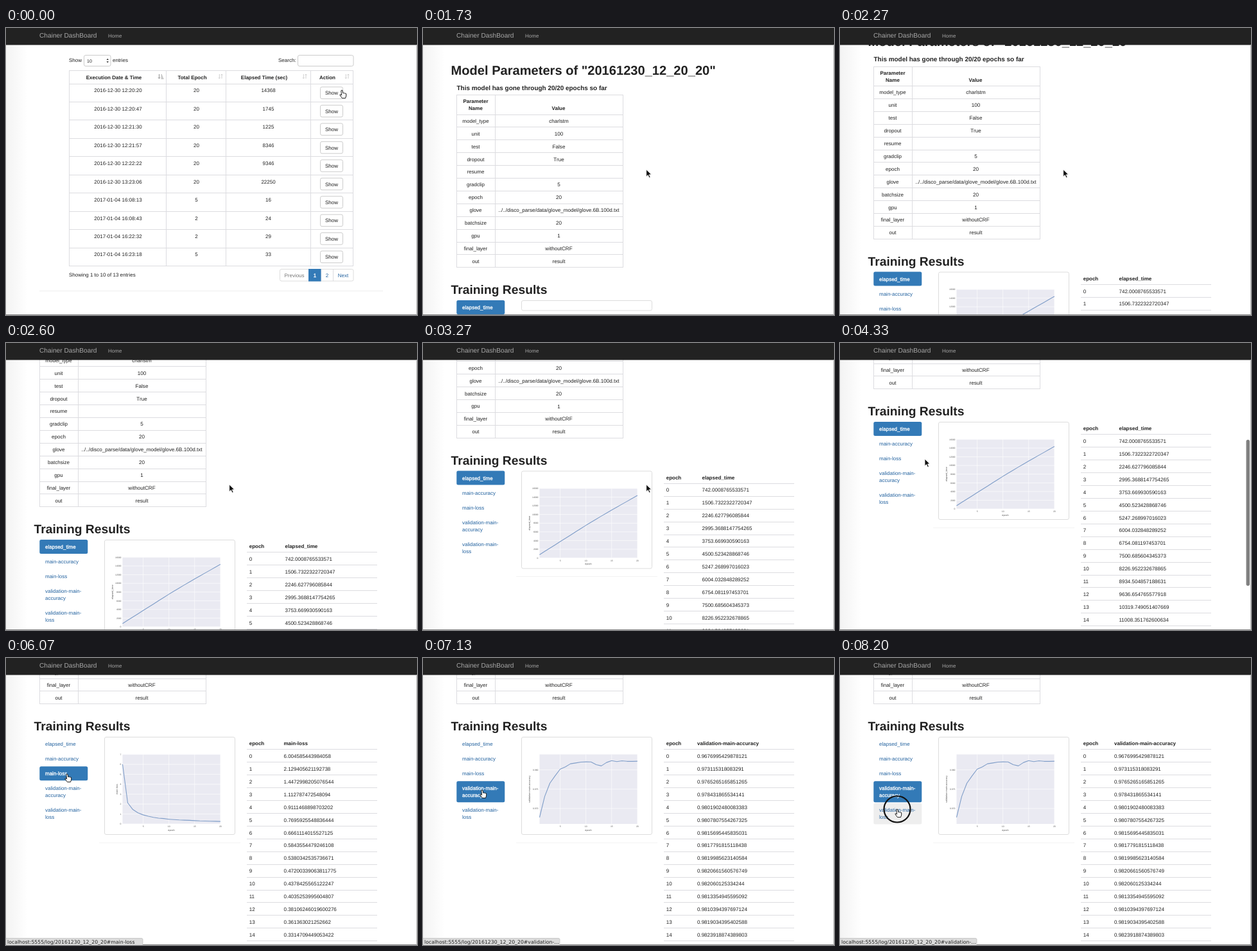
These frames come from a looping animation (640x448 px, 8.27 s). An HTML page:

```html
<!DOCTYPE html>
<html>
<head>
<meta charset="utf-8">
<title>Chainer DashBoard</title>
<style>
html, body { margin: 0; width: 100%; height: 100%; overflow: hidden; background: #fff; }
svg { display: block; }
text { font: 8px "Liberation Sans", Arial, sans-serif; fill: #222; text-rendering: geometricPrecision; white-space: pre; }
.b { font-weight: bold; }
.m { text-anchor: middle; }
.e { text-anchor: end; }
.link { fill: #23629f; }
.on { fill: #fff; stroke: #fff; stroke-width: .3; }
.nav { fill: #a6a6a6; }
.muted { fill: #777; }
.tick { fill: #555; }
.box { fill: #fff; stroke: #ccc; }
.card { fill: #fff; stroke: #ddd; }
.line { fill: none; stroke: #dcdce0; shape-rendering: crispEdges; }
.faint { stroke: #eee; shape-rendering: crispEdges; }
.grid { stroke: #fff; stroke-width: .6; }
#url { font: 7.75px "DejaVu Sans", sans-serif; }
</style>
</head>
<body>
<svg id="stage" width="640" height="448" viewBox="0 0 640 448"></svg>
<script>
const LOOP = 8270, PAGE_AT = 700, LOADED_AT = 1850, PRESS = 200;
const $ = id => document.getElementById(id);

// Markup helpers; text is placed by its vertical centre.
const text = (x, y, s, cls = '', size = 8) =>
  `<text x="${x}" y="${y + size * .36}" class="${cls}" style="font-size:${size}px">${s}</text>`;
const rect = (x, y, w, h, attrs, r = 0) =>
  `<rect x="${x}" y="${y}" width="${w}" height="${h}" rx="${r}" ${attrs}/>`;
const path = (d, attrs = 'class="line"') => `<path d="${d}" ${attrs}/>`;
const each = (n, fn) => Array.from({length: n}, (_, i) => fn(i)).join('');

let seed = 7;
const noise = size => {
  seed = seed * 16807 % 2147483647;
  return (seed / 2147483647 * 2 - 1) * size;
};

// Each metric is a smooth curve over epochs 1 to 20 plus a little noise.
const tabs = [
  {name: 'elapsed_time', col: 434.5, axis: [0, 16000, 2000, 0],
   curve: n => 750 * n - 26 * Math.max(0, n - 10) ** 1.38 + noise(8)},
  {name: 'main-accuracy', col: 430.5, axis: [.9, 1, .02, 2],
   curve: n => 1 - .0823 * n ** -.74 + noise(.0003)},
  {name: 'main-loss', col: 432.5, axis: [0, 7, 1, 0],
   curve: n => 4 * n ** -.92 + 2 * n ** -8 + noise(.01)},
  {name: 'validation-main-accuracy', col: 427, axis: [.966, .984, .005, 3],
   curve: n => .9823 - .0145 * Math.exp((1 - n) / 2.2) - .0016 * Math.exp(-((n - 12.7) ** 2)) + noise(.0003)},
  {name: 'validation-main-loss'}
];
tabs.reduce((y, tab) => {
  tab.lines = tab.name.split(/(?<=^validation-main-)/);
  tab.h = 11 + 11 * tab.lines.length;
  tab.y = y;
  return y + tab.h + 1.1;
}, 425);

function listPage() {
  const heads = [['Execution Date &amp; Time', 168, 241], ['Total Epoch', 290, 334],
    ['Elapsed Time (sec)', 402, 465], ['Action', 500.5, 531]];
  const rows = `2016-12-30 12:20:20|20|14368
2016-12-30 12:20:47|20|1745
2016-12-30 12:21:30|20|1225
2016-12-30 12:21:57|20|8346
2016-12-30 12:22:22|20|9346
2016-12-30 13:23:06|20|22250
2017-01-04 16:08:13|5|16
2017-01-04 16:08:43|2|24
2017-01-04 16:22:32|2|29
2017-01-04 16:23:18|5|33`.split('\n').map(row => row.split('|'));
  const centers = [174.5, 296.5, 408.5];
  const sortIcon = (x, active) => path(active
    ? `M${x - 2.5} 72v7l-1.5-1.7m1.5 1.7l1.5-1.7M${x + .5} 73h1.5m-1.5 2h2.3m-2.3 2h3.1m-3.1 2h4`
    : `M${x - 1.7} 72v7l-1.3-1.5m1.3 1.5l1.3-1.5M${x + 2} 79v-7l-1.3 1.5m1.3-1.5l1.3 1.5`,
    `fill="none" stroke="${active ? '#888' : '#ccc'}" stroke-width=".9"`);
  return text(98, 50.5, 'Show') + rect(121.5, 42.5, 41.5, 17, 'class="box"', 2.5) +
    text(126, 51, '10', '', 7) +
    path('M156.5 50l1.7-2.5 1.7 2.5zM156.5 52l1.7 2.5 1.7-2.5z', 'fill="#444"') +
    text(166, 50.5, 'entries') + text(424, 50.5, 'Search:') +
    rect(454.5, 42.5, 86.5, 17, 'class="box"', 2.5) +
    rect(98.5, 66.5, 442, 305, 'class="line"') +
    path('M249.5 66.5v305M342.5 66.5v305M474.5 66.5v305') +
    heads.map(([s, x, icon], i) => text(x, 76.7, s, 'b m') + sortIcon(icon, !i)).join('') +
    rows.map((row, i) => {
      const y = 87 + 28.45 * i;
      return path(`M98.5 ${y}h442`) + row.map((s, k) => text(centers[k], y + 10.5, s, 'm')).join('') +
        rect(489.5, y + 5, 35, 18.5, 'class="box"', 2.5) + text(507, y + 14.4, 'Show', 'm');
    }).join('') +
    text(98, 385.5, 'Showing 1 to 10 of 13 entries') +
    rect(426.5, 376.5, 114.5, 18.5, 'class="card"', 2.5) + path('M490.5 376.5v18.5M509.5 376.5v18.5') +
    rect(471, 376, 19.5, 19.5, 'fill="#337ab7"') +
    text(449, 386, 'Previous', 'm muted') + text(481, 386, '1', 'm on') +
    text(500, 386, '2', 'm link') + text(525, 386, 'Next', 'm link') +
    path('M52 410.5h535', 'class="faint"');
}

function modelPage() {
  const params = Object.entries({
    model_type: 'charlstm', unit: 100, test: 'False', dropout: 'True', resume: '', gradclip: 5, epoch: 20,
    glove: '../../disco_parse/data/glove_model/glove.6B.100d.txt',
    batchsize: 20, gpu: 1, final_layer: 'withoutCRF', out: 'result'
  });
  return text(43.5, 65.5, 'Model Parameters of "20161230_12_20_20"', 'b', 20.1) +
    text(52.5, 93, 'This model has gone through 20/20 epochs so far', 'b', 9.95) +
    rect(52.5, 104.5, 259, 269.3, 'class="line"') + path('M112 104.5v269.3') +
    text(82, 114.5, 'Parameter', 'b m') + text(82, 125.3, 'Name', 'b m') + text(211, 125.3, 'Value', 'b m') +
    params.map(([k, v], i) => {
      const y = 135 + 19.9 * i;
      return path(`M52.5 ${y}h259`) + text(82, y + 10, k, 'm') + text(211.5, y + 10, v, 'm', 8.1);
    }).join('') +
    text(43.5, 408.2, 'Training Results', 'b', 19.3);
}

function chart(name, [lo, hi, step, digits], data) {
  const X = epoch => 181.5 + 8.02 * (epoch - 1), Y = v => 561 - 108.5 * (v - lo) / (hi - lo);
  const first = Math.ceil(lo / step - 1e-6);
  const ticks = Math.floor(hi / step + 1e-6) - first + 1;
  return rect(153.5, 425.5, 203, 152, 'class="card"', 2.5) +
    rect(181.5, 452.5, 152.5, 108.5, 'fill="#eaeaf2"') +
    each(4, i => {
      const x = X(5 * i + 5);
      return path(`M${x} 452.5v108.5`, 'class="grid"') + text(x, 565.2, 5 * i + 5, 'tick m', 3.4);
    }) +
    each(ticks, i => {
      const v = (first + i) * step;
      return path(`M181.5 ${Y(v)}h152.5`, 'class="grid"') + text(179.5, Y(v), v.toFixed(digits), 'tick e', 3.4);
    }) +
    text(257.5, 570.2, 'epoch', 'tick m', 3.8) +
    `<g transform="translate(${hi === 7 ? 173 : 166} 506.7) rotate(-90)">${text(0, 0, name, 'tick m', 3.8)}</g>` +
    path('M' + data.map((v, i) => `${X(i + 1)} ${Y(v)}`).join('L'),
      'fill="none" stroke="#7f9dc8" stroke-width="1.1" stroke-linejoin="round"');
}

function panel({name, col, axis, curve}) {
  const data = Array.from({length: 20}, (_, i) => curve(i + 1));
  return chart(name, axis, data) + path('M145 590h220', 'class="faint" opacity=".7"') +
    text(378.7, 435.2, 'epoch', 'b') + text(col, 435.2, name, 'b') +
    data.map((v, i) => {
      const y = 444.8 + 19.93 * i;
      return path(`M374.5 ${y}h203.5`) + text(378.7, y + 10.3, i) + text(col, y + 10.3, v);
    }).join('');
}

const tabList = (active, hover) => tabs.map((tab, i) => {
  const fill = i === active ? '#337ab7' : i === hover ? '#eee' : 'none';
  return rect(52.3, tab.y, 75, tab.h, `fill="${fill}"`, 2.5) +
    tab.lines.map((s, k) => text(61, tab.y + 11.2 + 11 * k, s, i === active ? 'on' : 'link')).join('');
}).join('');

$('stage').innerHTML = `
  <defs><linearGradient id="shade"><stop stop-color="#f3f3f3"/><stop offset="1" stop-color="#fff"/></linearGradient></defs>
  ${rect(0, 26, 34, 422, 'fill="url(#shade)"')}
  <g id="list">${listPage()}</g>
  <g id="model">${modelPage()}<g id="tabs"></g>
    <g id="pending">${rect(153.5, 425.5, 203, 15.5, 'class="card"', 2.5)}</g>
    ${each(4, i => `<g id="panel${i}">${panel(tabs[i])}</g>`)}
  </g>
  ${rect(0, 0, 640, 26.5, 'fill="#222"')}
  ${text(52, 11.7, 'Chainer DashBoard', 'nav', 10.2)}
  ${text(159, 11.7, 'Home', 'nav')}
  ${path('M0 447.5h640', 'stroke="#888"')}
  ${path('M639.5 26v422', 'stroke="#bbb"')}
  ${rect(632.5, 0, 5.5, 228, 'id="thumb" fill="#808080"', 2.7)}
  <g id="status">${rect(-2, 437.5, 215, 14, 'fill="#dcdcdc" stroke="#bbb" stroke-width=".7"', 2)}
    <text id="url" x="2" y="446"></text></g>
  <g id="cursor">
    <circle id="ring" r="20.5" fill="none" stroke="#111" stroke-width="2.2"/>
    ${path('M0 0v11l2.6-2.4 1.9 4.2 1.9-.9-1.9-4 3.4-.2z', 'id="arrow" fill="#111" stroke="#fff" stroke-width=".8"')}
    ${path('M-1.2 .8q1.2-1.6 2.3 0l.7 4q1-.9 1.7.1q1-.7 1.7.3q1.3-.5 1.5.8v3l-1.2 3.6h-5l-3.4-4.6q-.5-1.5 1.2-1.2l1.3 1.3z',
      'id="hand" fill="#fff" stroke="#111" stroke-width=".95" stroke-linejoin="round"')}
  </g>`;

// Eases through moves {from, to, v}, resting between them.
const along = (start, moves, t) => moves.reduce((value, {from, to, v}) => {
  const p = Math.min(1, Math.max(0, (t - from) / (to - from)));
  return value + (v - value) * p * p * (3 - 2 * p);
}, start);

const moves = [
  {from: 900, to: 1450, x: 347.7, y: 221},
  {from: 3900, to: 4310, x: 132, y: 181},
  {from: 4400, to: 4650, x: 93, y: 158},
  {from: 5200, to: 5500, x: 95, y: 181},
  {from: 6250, to: 6600, x: 92, y: 206},
  {from: 7650, to: 8000, x: 89, y: 236}
];
const movesX = moves.map(m => ({...m, v: m.x})), movesY = moves.map(m => ({...m, v: m.y}));
const scrolls = [{from: 2050, to: 2580, v: 118}, {from: 2800, to: 3250, v: 225.5}, {from: 3500, to: 3950, v: 302}];
const presses = [150, 4750, 5650, 6850, 8100];
const show = (id, on) => $(id).style.display = on ? '' : 'none';

function draw() {
  const t = performance.now() % LOOP;
  const x = along(523, movesX, t), y = along(97, movesY, t), scroll = along(0, scrolls, t);
  const onModel = t >= PAGE_AT, loaded = t >= LOADED_AT;
  const active = presses.slice(1, 4).filter(p => t >= p + PRESS).length;
  const hover = onModel && x > 52 && x < 128
    ? tabs.findIndex(tab => y + scroll >= tab.y && y + scroll < tab.y + tab.h + 1.1) : -1;
  const hand = !onModel || hover >= 0;

  show('list', !onModel);
  show('model', onModel);
  $('model').setAttribute('transform', `translate(0 ${-scroll})`);
  $('tabs').innerHTML = tabList(active, hover);
  show('pending', !loaded);
  for (let i = 0; i < 4; i++) show('panel' + i, loaded && i === active);

  show('status', hover >= 0);
  if (hover >= 0) {
    $('url').textContent = 'localhost:5555/log/20161230_12_20_20#' +
      tabs[hover].name.replace(/^validation-.*/, 'validation-...');
  }
  $('thumb').setAttribute('y', 151 + (scroll - 302) * .56);
  $('thumb').style.opacity = t < 3550 ? 0 : along(1, [{from: 5280, to: 5500, v: 0}], t);

  $('cursor').setAttribute('transform', `translate(${x} ${y})`);
  show('hand', hand);
  show('arrow', !hand);
  show('ring', presses.some(p => t >= p && t < p + PRESS));
  requestAnimationFrame(draw);
}
draw();
</script>
</body>
</html>
```
